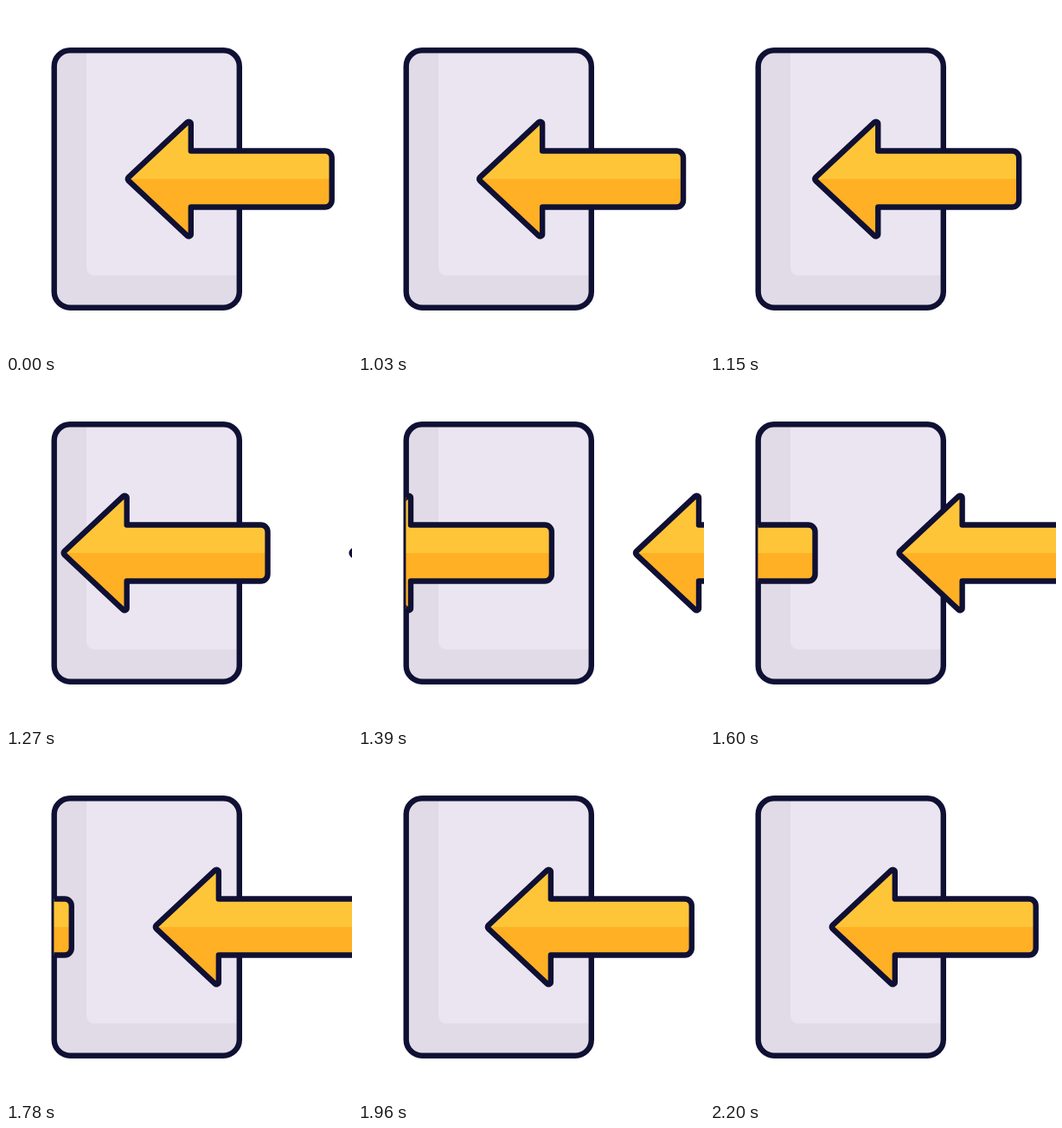
An HTML page with a canvas for the animation above (2230 ms loop, 400 by 400 pixels).

```html
<!DOCTYPE html>
<html lang="en">
<head>
<meta charset="utf-8">
<title>Arrow through door</title>
<style>
  html, body { margin: 0; width: 100%; height: 100%; overflow: hidden; background: #fff; }
  canvas { display: block; width: 400px; height: 400px; }
</style>
</head>
<body>
<canvas id="stage" width="400" height="400"></canvas>
<script>
const ctx = document.getElementById('stage').getContext('2d');
const LOOP = 2230, REST = 1000, MOVE = 1200, STEP = 30, TRAVEL = 333;
const INK = '#0f1034';

const bezier = (a, b, s) => 3 * (1 - s) ** 2 * s * a + 3 * (1 - s) * s * s * b + s ** 3;

function ease(p) {
  if (p <= 0) return 0;
  if (p >= 1) return 1;
  let lo = 0, hi = 1;
  for (let i = 0; i < 30; i++) {
    const mid = (lo + hi) / 2;
    if (bezier(0.337, 0.245, mid) < p) lo = mid; else hi = mid;
  }
  return bezier(0, 1, lo);
}

function roundRect(x, y, w, h, r) {
  const path = new Path2D();
  path.roundRect(x, y, w, h, r);
  return path;
}

function arrowPath() {
  const path = new Path2D();
  path.moveTo(213.8, 150);
  path.arcTo(213.8, 130.5, 139.6, 200, 2.5);
  path.arcTo(139.6, 200, 213.8, 269.5, 2.5);
  path.arcTo(213.8, 269.5, 213.8, 232.5, 2.5);
  path.lineTo(213.8, 232.5);
  path.arcTo(376.7, 232.5, 376.7, 200, 8);
  path.arcTo(376.7, 167.5, 213.8, 167.5, 8);
  path.lineTo(213.8, 167.5);
  path.closePath();
  return path;
}

const door = roundRect(55.7, 51.2, 214.1, 297.5, 18.5);
const panel = roundRect(93, 30, 220, 281.5, 9);
const arrow = arrowPath();

function outline(path) {
  ctx.strokeStyle = INK;
  ctx.lineWidth = 6.4;
  ctx.lineJoin = 'round';
  ctx.stroke(path);
}

function drawDoor() {
  ctx.save();
  ctx.clip(door);
  ctx.fillStyle = '#e0dbe6';
  ctx.fillRect(50, 40, 230, 320);
  ctx.fillStyle = '#eae5f0';
  ctx.fill(panel);
  ctx.restore();
  outline(door);
}

function drawArrow(dx) {
  ctx.save();
  ctx.translate(dx, 0);
  ctx.save();
  ctx.clip(arrow);
  ctx.fillStyle = '#ffc538';
  ctx.fillRect(130, 120, 260, 80);
  ctx.fillStyle = '#ffb024';
  ctx.fillRect(130, 200, 260, 80);
  ctx.restore();
  outline(arrow);
  ctx.restore();
}

function draw(time) {
  const step = Math.floor((time % LOOP - REST + 0.5) / STEP);
  const shift = -TRAVEL * ease(step * STEP / MOVE);
  ctx.fillStyle = '#fff';
  ctx.fillRect(0, 0, 400, 400);
  drawDoor();
  ctx.save();
  ctx.beginPath();
  ctx.rect(55.4, 0, 345, 400);
  ctx.clip();
  drawArrow(shift);
  drawArrow(shift + TRAVEL);
  ctx.restore();
}

const start = performance.now();
function tick() {
  draw(performance.now() - start);
  requestAnimationFrame(tick);
}
tick();
</script>
</body>
</html>
```
